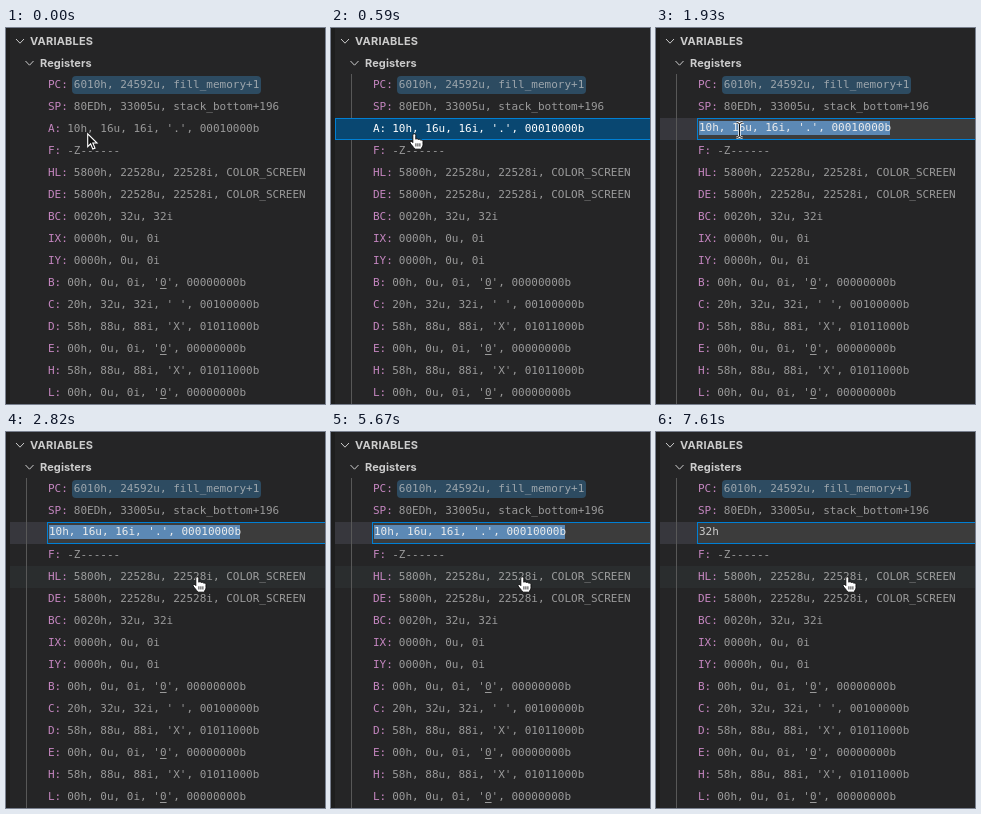
Recreate the animation shown at these times as an HTML page. Size 319 by 376 pixels, loop 8000 ms.

```html
<!DOCTYPE html>
<html lang="en">
<head>
<meta charset="utf-8">
<title>Register view</title>
<style>
  html, body { margin: 0; width: 100%; height: 100%; overflow: hidden; background: #252526; }
  #stage { position: relative; width: 319px; height: 376px; overflow: hidden; background: #252526; color: #ccc; }
  #stage * { box-sizing: border-box; }
  #stage > * { position: absolute; }
  .strip { left: 0; top: 0; width: 4px; height: 376px; background: #1e1e1e; }
  .head { font: 700 11px/22px Inter, "Open Sans", sans-serif; white-space: pre; }
  .row { left: 4px; width: 330px; height: 22px; font: 11px/22px "DejaVu Sans Mono", monospace; white-space: pre; }
  .row.hover { background: #2a2d2e; }
  .row i { position: absolute; left: 16px; top: 0; width: 1px; height: 22px; background: #585858; }
  .row b { position: absolute; left: 38px; font-weight: 400; color: #c586c0; }
  .row span { position: absolute; color: rgba(204, 204, 204, .7); }
  .row u { text-underline-offset: 2px; }
  .row .changed { top: 2px; height: 18px; line-height: 18px; padding: 0 2px; border-radius: 4px; background: #2d4b61; }
  .row.selected { background: #094771; box-shadow: inset 0 0 0 1px #007fd4; }
  .row.selected b, .row.selected span { color: #fff; }
  .row.editing { background: #37373d; }
  .row.editing b, .row.editing span { visibility: hidden; }
  #focus { left: 4px; top: 24px; width: 330px; height: 360px; border: 1px solid #007fd4; }
  #input { left: 41px; top: 90px; width: 293px; height: 22px; border: 1px solid #007fd4;
    background: #3c3c3c; font: 11px/20px "DejaVu Sans Mono", monospace; white-space: pre; }
  #mark { position: absolute; left: 1px; top: 2px; width: 191px; height: 14px; background: #5c89b5; }
  #typed { position: absolute; left: 1px; top: -1px; }
  #caret { top: 93px; width: 1px; height: 14px; background: #d0d0d0; }
  #tip { left: 191px; top: 162px; width: 280px; height: 19px; padding-left: 6px; border: 1px solid #555; background: #2b2b2c;
    color: #f0f0f0; font: 11px/17px Inter, "Open Sans", sans-serif; white-space: pre; }
  svg { overflow: visible; }
</style>
</head>
<body>
<div id="stage">
  <div class="strip"></div>
  <svg width="319" height="46" fill="none" stroke="#ccc">
    <path d="M10 11l4 4.2 4-4.2M19.5 33l4 4.2 4-4.2"/>
  </svg>
  <div class="head" style="left:24px;top:2px;letter-spacing:.2px">VARIABLES</div>
  <div class="head" style="left:34px;top:24px;letter-spacing:.1px">Registers</div>
  <div id="focus"></div>
  <div id="input"><div id="mark"></div><div id="typed"></div></div>
  <div id="caret"></div>
  <svg id="arrow" width="11" height="17">
    <path d="M.7 .9V13.6l2.9-2.8 2.2 5.2 2.2-.9-2.2-5.1h4.2z" fill="#111" stroke="#fff" stroke-width="1.1"/>
  </svg>
  <svg id="hand" width="15" height="17">
    <path d="M5.2.8c1 0 1.6.7 1.6 1.7v3.7c.3-.6 2.2-.7 2.5.3.7-.5 2.1-.3 2.4.7 1-.3 2.3.1 2.3 1.3v3.2c0 1.7-1.3 2.6-1.3 3.3v1.2H5.4v-1C4.9 15 2.2 11.5 1.2 10.1.5 9.1 1.8 7.9 2.9 8.7l.9.9V2.5C3.8 1.5 4.3.8 5.2.8z"
      fill="#fff" stroke="#111"/>
    <path d="M6.9 10.3v3.2M8.9 10.3v3.2M10.9 10.3v3.2" stroke="#222" stroke-width=".9"/>
  </svg>
  <svg id="beam" width="9" height="18" fill="none">
    <path d="M1.5 1.5q3 0 3 2v11q0 2-3 2M7.5 1.5q-3 0-3 2M4.5 14.5q0 2 3 2" stroke="#fff" stroke-width="2.4"/>
    <path d="M1.5 1.5q3 0 3 2v11q0 2-3 2M7.5 1.5q-3 0-3 2M4.5 14.5q0 2 3 2" stroke="#111"/>
  </svg>
  <div id="tip">5800h, 22528u, 22528i, COLOR_SCREEN</div>
</div>
<script>
const LOOP = 8000, ROW_H = 22, TOP = 46, CHAR = 6.62;
const $ = id => document.getElementById(id);

const registers = [
  ["PC", "6010h, 24592u, fill_memory+1"],
  ["SP", "80EDh, 33005u, stack_bottom+196"],
  ["A", "10h, 16u, 16i, '.', 00010000b"],
  ["F", "-Z------"],
  ["HL", "5800h, 22528u, 22528i, COLOR_SCREEN"],
  ["DE", "5800h, 22528u, 22528i, COLOR_SCREEN"],
  ["BC", "0020h, 32u, 32i"],
  ["IX", "0000h, 0u, 0i"],
  ["IY", "0000h, 0u, 0i"],
  ["B", "00h, 0u, 0i, '0', 00000000b"],
  ["C", "20h, 32u, 32i, ' ', 00100000b"],
  ["D", "58h, 88u, 88i, 'X', 01011000b"],
  ["E", "00h, 0u, 0i, '0', 00000000b"],
  ["H", "58h, 88u, 88i, 'X', 01011000b"],
  ["L", "00h, 0u, 0i, '0', 00000000b"]
];
const A = 2, F = 3, HL = 4;

const rows = registers.map(([name, value], n) => {
  const row = document.createElement("div");
  const changed = n === 0;
  const x = 38 + (name.length + 1) * CHAR + (changed ? 4 : 6);
  row.style.top = TOP + n * ROW_H + "px";
  row.innerHTML = `<i></i><b>${name}:</b><span class="${changed ? "changed" : ""}" style="left:${x}px">` +
    value.replace("'0'", "'<u>0</u>'") + "</span>";
  $("stage").insertBefore(row, $("focus"));
  return row;
});
const guides = rows.map(row => row.querySelector("i"));

// Each step holds from its start time until the next one.
const pointer = [
  [0, "arrow", 81, 105], [150, "arrow", 81, 104], [300, "arrow", 82, 103],
  [440, "hand", 78, 105], [1340, "hand", 79, 102], [1930, "beam", 79, 93],
  [2530, "hand", 136, 129], [2680, "hand", 163, 141], [2820, "hand", 186, 144]
];
const hover = [[0, -1], [440, A], [590, -1], [2530, F], [2680, HL]];
const rowState = [[0, ""], [590, "selected"], [1930, "editing"]];
const guideAlpha = [[0, 0], [440, .4], [590, 1]];
const typing = [[0, registers[A][1]], [5820, "3"], [6120, "32"], [7160, "32h"]];
const caretOn = [[0, false], [5820, true], [6560, false], [7010, true], [7610, false]];

const at = (steps, t) => steps.filter(s => s[0] <= t).pop().slice(1);
const within = (t, from, to) => t >= from && t < to;
const show = (el, on) => { el.style.visibility = on ? "visible" : "hidden"; };

function draw(t) {
  const [kind, x, y] = at(pointer, t);
  for (const id of ["arrow", "hand", "beam"]) show($(id), id === kind);
  $(kind).style.left = x + "px";
  $(kind).style.top = y + "px";

  const [hot] = at(hover, t), [state] = at(rowState, t), [alpha] = at(guideAlpha, t);
  rows.forEach((row, n) => {
    row.className = "row" + (n === hot ? " hover" : "") + (n === A && state ? " " + state : "");
    guides[n].style.opacity = alpha;
  });
  show(guides[A], !within(t, 590, 740));
  show($("focus"), within(t, 440, 590));

  const [text] = at(typing, t), editing = state === "editing", marked = t < 5820;
  show($("input"), editing);
  show($("mark"), editing && marked);
  $("typed").textContent = text;
  $("typed").style.color = marked ? "#ececec" : "#ccc";
  show($("caret"), at(caretOn, t)[0]);
  $("caret").style.left = Math.round(43 + text.length * CHAR) + "px";
  show($("tip"), within(t, 4170, 5670));
}

const start = performance.now();
function tick() {
  draw((performance.now() - start) % LOOP);
  requestAnimationFrame(tick);
}
tick();
</script>
</body>
</html>
```
